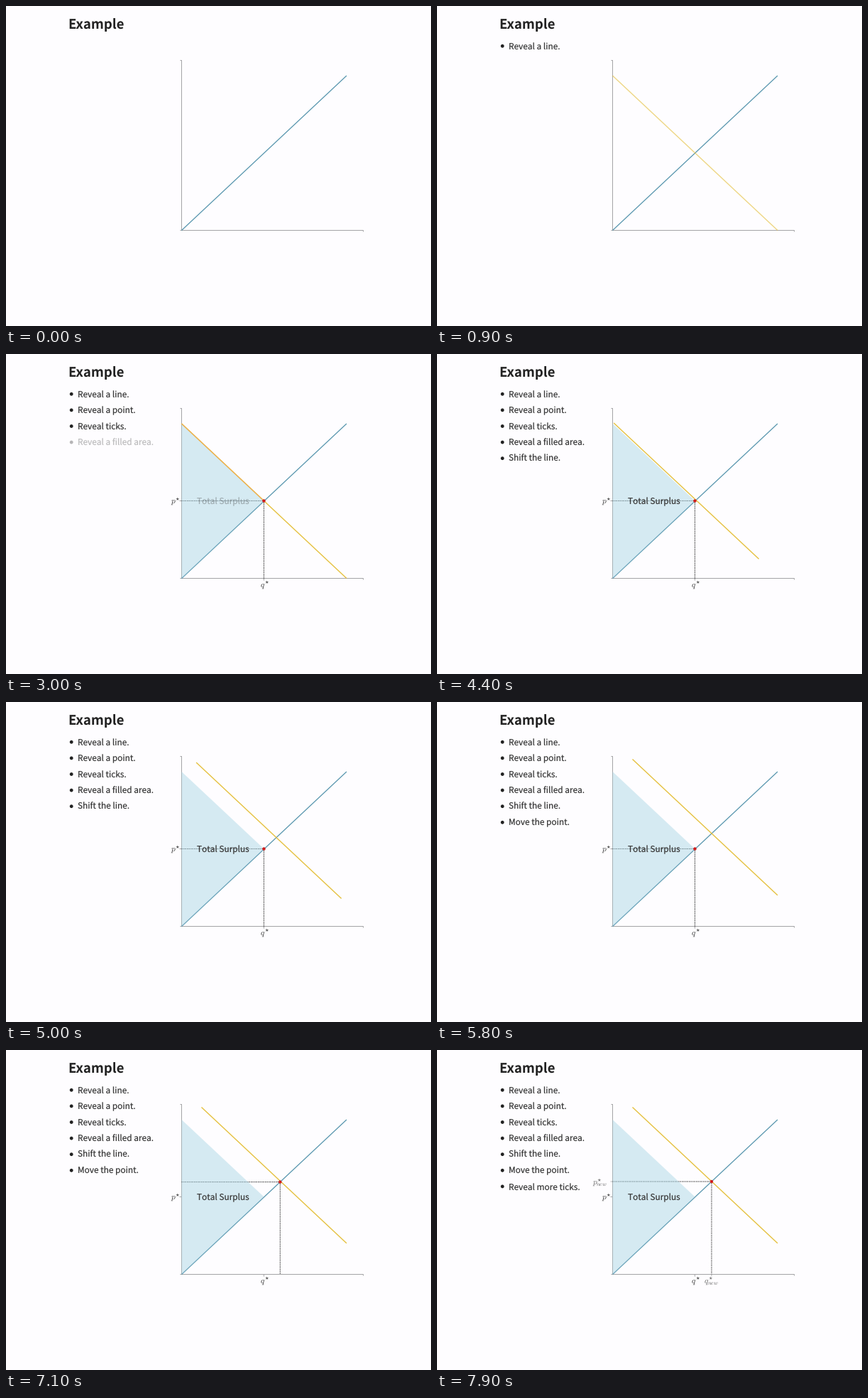
Write a matplotlib script that moves like this. It is 599x450 px and loops after 8000 ms.

```python
import matplotlib.pyplot as plt
from matplotlib.animation import FuncAnimation
from matplotlib.patches import Circle

W, H, DPI = 599, 450, 100
STEP, LOOP = 100, 8000
PT = 72 / DPI                      # points per pixel
BG, INK, SOFT = "#fefdff", "#222222", "#3c3c3c"
BLUE, YELLOW, GREY = "#5594ad", "#e5c03c", "#a4a4a6"
X0, Y0 = 247.5, 315.5              # chart corner
SLOPE = 217 / 232

plt.rcParams.update({
    "font.family": "Noto Sans CJK JP",
    "mathtext.fontset": "cm",
    "text.hinting": "none",
    "path.snap": False,
})

fig = plt.figure(figsize=(W / DPI, H / DPI), dpi=DPI, facecolor=BG)
ax = fig.add_axes([0, 0, 1, 1])
ax.set(xlim=(0, W), ylim=(H, 0))
ax.axis("off")


def line(xs, ys, color, width, z=2, **kw):
    return ax.plot(xs, ys, color=color, lw=width * PT, zorder=z,
                   solid_capstyle="butt", **kw)[0]


def label(x, y, s, size, **kw):
    kw = {"color": SOFT, "va": "baseline", "zorder": 6, **kw}
    return ax.text(x, y, s, fontsize=size * PT, **kw)


def dot(x, y, radius, color, z):
    return ax.add_patch(Circle((x, y), radius, color=color, lw=0, zorder=z))


def ramp(t, start, length):
    return min(max((t - start) / length, 0), 1)


def cubic(u):
    return 4 * u ** 3 if u < 0.5 else 1 - 4 * (1 - u) ** 3


def fade(parts, alpha):
    for part in parts:
        part.set_alpha(alpha)


# Axes with their end ticks
line([245.5, X0, X0], [76.5, 76.5, Y0], GREY, 1, 1)
line([245.5, 503.5, 503.5], [Y0, Y0, 317.5], GREY, 1, 1)
line([X0, 480], [Y0, 98], BLUE, 1.25)

label(87.5, 31.5, "Example", 18.6, weight="bold", color=INK)

ITEMS = [
    ("Reveal a line.", 450, 400),
    ("Reveal a point.", 1350, 400),
    ("Reveal ticks.", 2150, 400),
    ("Reveal a filled area.", 2870, 400),
    ("Shift the line.", 3985, 400),
    ("Move the point.", 5480, 300),
    ("Reveal more ticks.", 7430, 400),
]
bullets = []
for k, (text, start, length) in enumerate(ITEMS):
    y = 56.3 + 22.6 * k
    parts = [dot(92.2, y, 2.4, INK, 6), label(101, y + 4.45, text, 11.85)]
    bullets.append((parts, start, length))

demand = line([], [], YELLOW, 1.35, 3)
edge = line([X0, 363.5], [98, 206.5], "#f0b04e", 1.3, 5)
area = ax.fill([X0, 363.5, X0], [98, 206.5, Y0], color="#add8e6", lw=0,
               zorder=4)[0]
title = label(305.5, 210.8, "Total Surplus", 11.85, ha="center")

dots = dict(ls=(0, (1.5, 1)), dash_capstyle="butt")
across = line([], [], "#333333", 1, 3, **dots)
down = line([], [], "#333333", 1, 3, **dots)
point = dot(0, 0, 2.2, "#cf1b1b", 5)


def symbol(x, y, letter, sub):
    """A starred letter with its baseline at y."""
    return [
        label(x, y, f"${letter}$", 11.5),
        label(x + 6, y - 4, r"$\star$", 8),
        label(x + 5.2, y + 2.8, f"${sub}$" if sub else "", 8),
    ]


def ticks(x, y, p_x, q_x, sub=""):
    return [
        line([244.5, X0], [y, y], GREY, 1, 1),
        line([x, x], [Y0, 318.5], GREY, 1, 1),
        *symbol(p_x, y + 3.6, "p", sub),
        *symbol(q_x, 327.3, "q", sub),
    ]


old_ticks = ticks(363.5, 206.5, 232, 358.3)
new_ticks = ticks(387, 185, 219.3, 376, "new")


def update(i):
    t = i * STEP
    for parts, start, length in bullets:
        fade(parts, ramp(t, start, length))

    # The shifting line is shorter than the resting one
    s = cubic(ramp(t, 3985, 1700))
    x, y = X0 + 28 * s, 98 - 17.5 * s
    span = 232.5 if t < 3985 else 204.5
    demand.set_data([x, x + span], [y, y + span * SLOPE])
    demand.set_alpha(ramp(t, 450, 700))

    m = cubic(ramp(t, 5725, 1700))
    px, py = 363.5 + 23.5 * m, 206.5 - 21.5 * m
    across.set_data([X0, px], [py, py])
    down.set_data([px, px], [py, Y0])
    point.center = px, py
    fade([across, down, point], ramp(t, 1350, 500))

    area.set_alpha(0.5 * ramp(t, 2870, 130))
    edge.set_alpha(ramp(t, 2870, 130) if t < 3985 else 0)
    title.set_alpha(ramp(t, 2830, 500))
    fade(old_ticks, ramp(t, 2150, 600))
    fade(new_ticks, ramp(t, 7430, 620))
    return []


anim = FuncAnimation(fig, update, frames=LOOP // STEP, interval=STEP,
                     init_func=lambda: update(0), repeat=True,
                     repeat_delay=0, blit=False)
plt.show()
```
